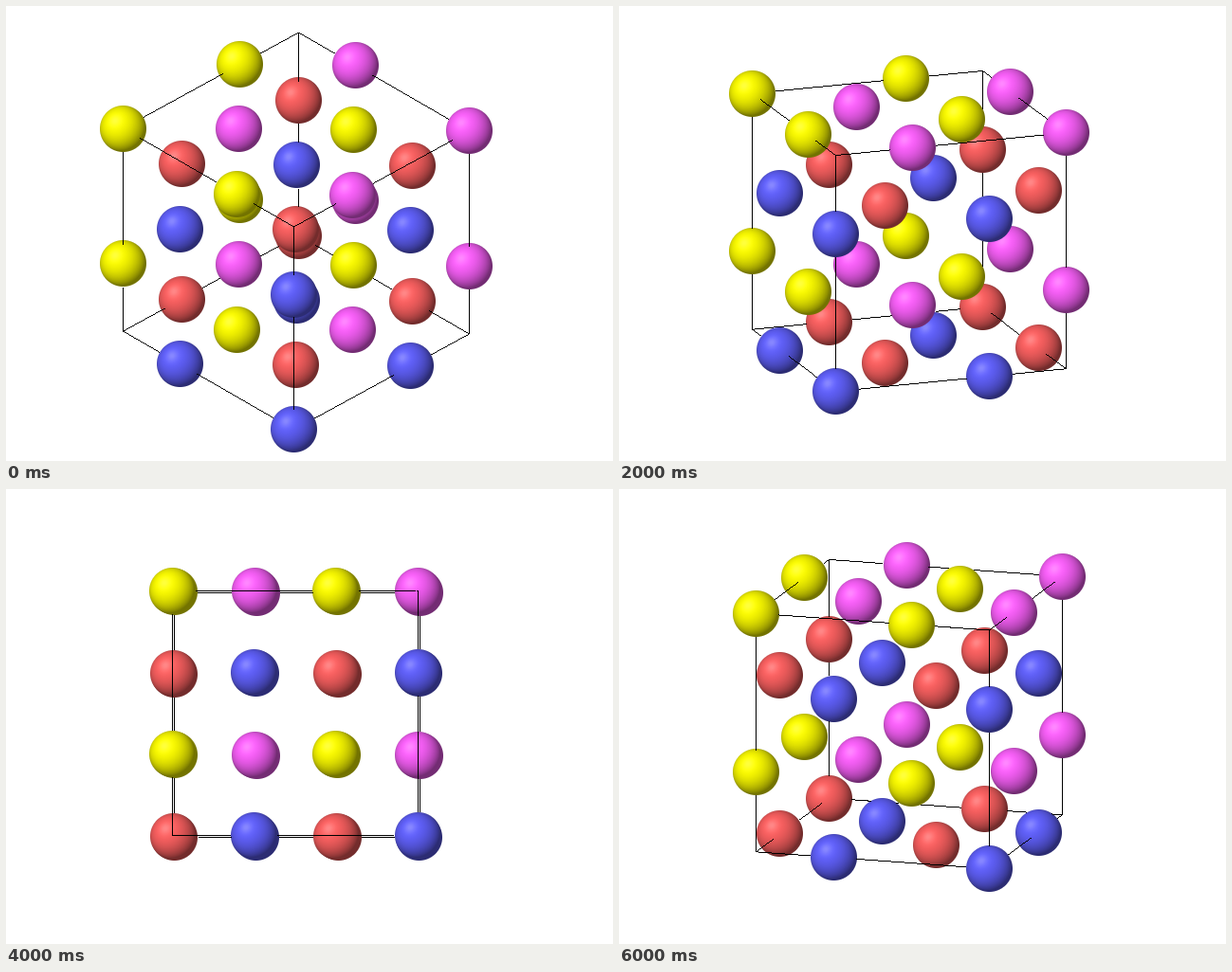
Write an HTML page with a canvas that moves like this. It is 640 by 480 pixels and loops after 8 s.

```html
<!DOCTYPE html>
<html lang="en">
<head>
<meta charset="utf-8">
<title>Crystal lattice</title>
<style>
html, body { margin: 0; width: 100%; height: 100%; overflow: hidden; background: #fff; }
canvas { display: block; }
</style>
</head>
<body>
<canvas id="stage" width="640" height="480"></canvas>
<script>
const ctx = document.getElementById('stage').getContext('2d');
const EDGE = 258.5, R = 24.5, CX = 306, CY = 237.5, HOLD = 2000;
// yaw and tilt of each view, in degrees
const VIEWS = [[44.2, 34.1], [20.05, 15.6], [89.45, -0.45], [72.7, 13.3]];
const COLORS = {
  yellow: [255, 255, 0],
  magenta: [255, 98, 255],
  blue: [98, 98, 255],
  red: [255, 98, 98]
};

function makeBall(rgb) {
  const size = 2 * R, ball = document.createElement('canvas');
  ball.width = ball.height = size;
  const g = ball.getContext('2d'), img = g.createImageData(size, size);
  const len = Math.hypot(1, 1, 2.5);
  for (let py = 0; py < size; py++) {
    for (let px = 0; px < size; px++) {
      let x = (px + 0.5 - R) / R, y = (py + 0.5 - R) / R;
      const d = Math.hypot(x, y);
      const alpha = Math.max(0, Math.min(1, (1 - d) * R + 0.5));
      if (d > 1) { x /= d; y /= d; }
      const z = Math.sqrt(Math.max(0, 1 - x * x - y * y));
      const lit = Math.max(0, (-x - y + 2.5 * z) / len);
      const shade = Math.min(1, 0.45 + 0.57 * lit);
      const gloss = 0.24 * lit ** 30;
      const at = 4 * (py * size + px);
      rgb.forEach((c, i) => {
        const base = c * shade;
        img.data[at + i] = base + (255 - base) * gloss;
      });
      img.data[at + 3] = 255 * alpha;
    }
  }
  g.putImageData(img, 0, 0);
  return ball;
}

const balls = {};
for (const name in COLORS) balls[name] = makeBall(COLORS[name]);

// face-centred sites: every lattice point with an even index sum
const atoms = [];
for (let i = 0; i < 4; i++)
  for (let j = 0; j < 4; j++)
    for (let k = 0; k < 4; k++) {
      if ((i + j + k) % 2) continue;
      const name = k % 2 ? (i % 2 ? 'red' : 'blue') : (i % 2 ? 'magenta' : 'yellow');
      atoms.push({ name, site: [i / 3, j / 3, k / 3] });
    }

const edges = [];
for (let axis = 0; axis < 3; axis++)
  for (const u of [0, 1])
    for (const v of [0, 1]) {
      const from = [u, u, u];
      from[(axis + 1) % 3] = v;
      from[axis] = 0;
      const to = from.slice();
      to[axis] = 1;
      edges.push([from, to]);
    }

// z grows away from the viewer
function projector([yaw, tilt]) {
  const rad = Math.PI / 180;
  const s = Math.sin(yaw * rad), c = Math.cos(yaw * rad);
  const st = Math.sin(tilt * rad), ct = Math.cos(tilt * rad);
  return site => {
    const [a, b, h] = site.map(v => (v - 0.5) * EDGE);
    const depth = a * s - b * c;
    return {
      x: CX + a * c + b * s,
      y: CY - depth * st + h * ct,
      z: depth * ct + h * st
    };
  };
}

function hidden(p, spheres) {
  return spheres.some(o => {
    const gap = R * R - (p.x - o.x) ** 2 - (p.y - o.y) ** 2;
    return gap > 0 && p.z > o.z - Math.sqrt(gap);
  });
}

function drawEdge(p, q, spheres) {
  const n = Math.max(1, Math.round(Math.max(Math.abs(q.x - p.x), Math.abs(q.y - p.y))));
  for (let i = 0; i <= n; i++) {
    const t = i / n;
    const m = {
      x: p.x + (q.x - p.x) * t,
      y: p.y + (q.y - p.y) * t,
      z: p.z + (q.z - p.z) * t
    };
    if (!hidden(m, spheres)) ctx.fillRect(Math.floor(m.x), Math.floor(m.y), 1, 1);
  }
}

function draw(view) {
  const project = projector(view);
  const spheres = atoms.map(a => ({ name: a.name, ...project(a.site) }));
  spheres.sort((a, b) => b.z - a.z);
  ctx.fillStyle = '#fff';
  ctx.fillRect(0, 0, 640, 480);
  for (const o of spheres)
    ctx.drawImage(balls[o.name], Math.round(o.x - R), Math.round(o.y - R));
  ctx.fillStyle = '#000';
  for (const [from, to] of edges) drawEdge(project(from), project(to), spheres);
}

let shown = -1;
function tick() {
  const index = Math.floor(performance.now() / HOLD) % VIEWS.length;
  if (index !== shown) {
    shown = index;
    draw(VIEWS[index]);
  }
  requestAnimationFrame(tick);
}
tick();
</script>
</body>
</html>
```
